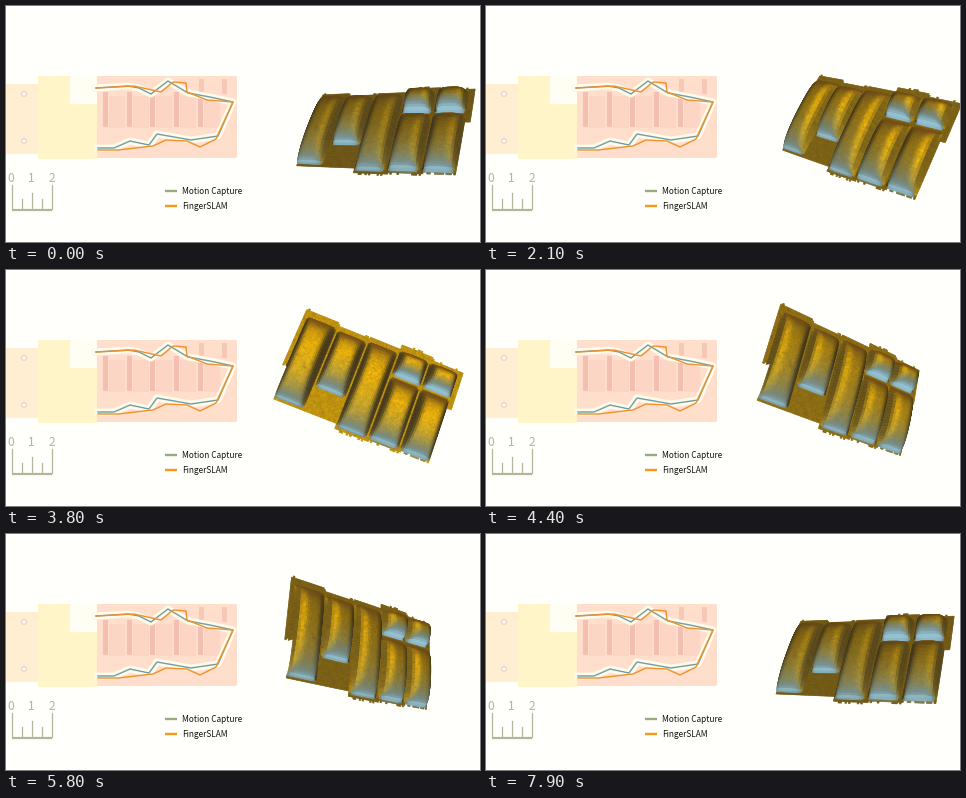
A matplotlib script for the animation above (8 s loop, 474x236 px).

```python
import numpy as np
import matplotlib.pyplot as plt
from matplotlib.animation import FuncAnimation
from matplotlib.collections import PolyCollection
from matplotlib.patches import Circle, Rectangle

W, H, DPI = 474, 236, 100
FRAMES, INTERVAL = 80, 100
PX = 72 / DPI
PAPER = "#fffffb"

fig = plt.figure(figsize=(W / DPI, H / DPI), dpi=DPI, facecolor=PAPER)
ax = fig.add_axes([0, 0, 1, 1])
ax.set(xlim=(0, W), ylim=(H, 0))
ax.axis("off")


def box(x0, y0, x1, y1, color):
    ax.add_patch(Rectangle((x0, y0), x1 - x0, y1 - y0, fc=color, lw=0))


def path(points, color, width, **style):
    x, y = zip(*points)
    ax.plot(x, y, color=color, lw=width * PX, **style)


def label(x, y, text, size, color, **style):
    ax.text(x, y, text, fontsize=size * PX, color=color,
            family="Noto Sans CJK JP", va="baseline", **style)


def draw_plate():
    box(0, 78, 33, 148, "#ffeed2")
    box(32, 70, 92, 153, "#fff5c8")
    box(91, 70, 231, 152, "#ffdecb")
    box(64, 70, 91, 98, "#fffef4")
    for i in range(5):
        x = 97 + 23.7 * i
        box(x + 6, 90, x + 22, 122, "#fcd5c4")
        box(x, 86, x + 5, 121, "#f3bfb0")
    for x in (193, 216):
        box(x, 73, x + 5, 88, "#f6c8b8")
    for y in (88, 135):
        ax.add_patch(Circle((18, y), 2.3, fc="#fffaf0", ec="#d8c9bb", lw=0.6))


def draw_tracks():
    capture = [(90, 82), (122, 80), (133, 82), (145, 88), (162, 75),
               (182, 87), (204, 91), (227, 96), (212, 130), (185, 134),
               (151, 128), (143, 139), (124, 135), (108, 142), (92, 142)]
    slam = [(90, 82), (128, 80), (155, 86), (167, 76), (180, 77), (181, 86),
            (201, 94), (227, 96), (210, 133), (194, 141), (181, 135),
            (160, 134), (147, 140), (112, 144), (92, 144)]
    path(capture, "#fffbec", 7, solid_joinstyle="round")
    path(capture, "#6f9f9f", 1.4)
    path(slam, "#ee912c", 1.4)


def draw_ruler():
    gray = "#b4b49c"
    path([(6, 203.5), (46, 203.5)], gray, 2.2, solid_capstyle="butt")
    for i in range(5):
        top = 193 - 14 * (i % 4 == 0) - 6 * (i == 2)
        path([(6 + 10 * i, 203), (6 + 10 * i, top)], gray, 1.2)
    for i in range(3):
        label(5 + 20.5 * i, 176.5, str(i), 12, gray, ha="center")


def draw_legend():
    for y, color, text in ((185, "#97ab85", "Motion Capture"),
                           (200, "#f2991c", "FingerSLAM")):
        path([(159, y), (171, y)], color, 2.4, solid_capstyle="butt")
        label(176.3, y + 3, text, 8.3, "#111111")


# Scanned slab: u runs along it, v from the far to the near edge (both 0..1).
LENGTH, DEPTH, RELIEF = 174, 100, 15
SPLIT = [(.05, .30), (.35, .98)]
COLUMNS = [[(.08, .94)], [(.10, .70)], [(.08, .99)], SPLIT, SPLIT]
FAR = np.array([0, .03, .02, -.04, 0])
NEAR = np.array([.97, .97, 1.03, 1.01, 1])


def relief(u, v):
    """Height of the rounded keys that stand on the slab."""
    height = np.zeros_like(u)
    for i, spans in enumerate(COLUMNS):
        s = (u - .108 - .193 * i) / .082
        for far, near in spans:
            q = (v - far) / (near - far)
            across = np.clip(1 - s ** 4, 0, 1)
            along = np.clip((1 - q ** 4) * (1 - (1 - q) ** 10), 0, 1)
            inside = (q > 0) & (q < 1)
            height = np.maximum(height, inside * np.sqrt(across * along))
    return RELIEF * height


def inside_outline(u, v):
    rng = np.random.default_rng(8)
    v = v + rng.uniform(-.008, .008, (1, u.shape[1]))
    column = np.clip(u * 5, 0, 4).astype(int)
    return ((v > FAR[column]) & (v < NEAR[column])
            & (u > .035 * (v > .62)) & (u < 1 - .035 * (v > .42)))


def slab_points(u, v):
    return np.stack([(u - .5) * LENGTH, (v - .5) * DEPTH, relief(u, v)], -1)


def rotation(t):
    """Slab orientation: depth tilt (p, q, r), then a spin in the picture."""
    turn = 2 * np.pi * t / 8
    sway = turn - 2 * np.pi * 1.1 / 8
    p = .07 + .56 * np.cos(sway - .18) - .15 * np.cos(2 * sway)
    q = .36 + .15 * np.cos(turn) + .05 * np.cos(2 * turn) + .11 * np.sin(2 * turn)
    r = np.sqrt(1 - p * p - q * q)
    spin = np.radians(14 + 9 * np.cos(turn - .75 * np.pi))
    k = 1 / (1 + r)
    tilt = np.array([[1 - p * p * k, -p * q * k, -p],
                     [-p * q * k, 1 - q * q * k, -q],
                     [p, q, r]])
    c, s = np.cos(spin), np.sin(spin)
    centre = np.array([369, 119]) + np.array([11, 6]) * np.cos(sway)
    return np.array([[c, -s, 0], [s, c, 0], [0, 0, 1]]) @ tilt, centre


def blend(a, b, amount):
    return a + (np.array(b) - a) * np.clip(amount, 0, 1)[..., None]


U, V = np.meshgrid(np.linspace(0, 1, 100), np.linspace(-.05, 1.04, 64))
CU, CV = ((g[1:, 1:] + g[:-1, :-1]) / 2 for g in (U, V))
KEEP = inside_outline(CU, CV)
POINTS = slab_points(U, V)

cells = slab_points(CU, CV)
slope_v, slope_u = np.gradient(cells[..., 2], CV[:, 0] * DEPTH, CU[0] * LENGTH)
NORMALS = np.stack([-slope_u, -slope_v, np.ones_like(CU)], -1)[KEEP]
NORMALS /= np.linalg.norm(NORMALS, axis=1, keepdims=True)
CELLS = cells[KEEP]
grain = np.random.default_rng(4).normal(1, .07, CU.shape)[KEEP]
LIT = grain * np.where(CELLS[:, 2] > 1, 1, .75)

surface = PolyCollection([], linewidths=.4)
ax.add_collection(surface, autolim=False)


def shade(view):
    """Gold where the surface faces the viewer, blue on the near slopes."""
    near, away = np.clip(NORMALS[:, 1], 0, 1), np.clip(-NORMALS[:, 1], 0, 1)
    facing = np.clip(NORMALS @ view, 0, 1) ** 4
    gold = facing * LIT * (1 - np.clip(1.6 * near, 0, 1))
    color = blend(np.array([66, 54, 24.]), (250, 188, 6), gold)
    color = blend(color, (176, 108, 16), .6 * away)
    return blend(color, (146, 194, 212), 1.05 * near) / 255


def update(frame):
    turn, centre = rotation(frame * INTERVAL / 1000)
    seen = POINTS @ turn.T
    xy = centre + seen[..., :2] * (1 + .0024 * seen[..., 2:])
    quads = np.stack([xy[:-1, :-1], xy[:-1, 1:], xy[1:, 1:], xy[1:, :-1]], 2)
    order = np.argsort(CELLS @ turn[2])
    colors = shade(turn[2])[order]
    surface.set_verts(quads[KEEP][order])
    surface.set_facecolor(colors)
    surface.set_edgecolor(colors)
    return surface,


draw_plate()
draw_tracks()
draw_ruler()
draw_legend()
anim = FuncAnimation(fig, update, frames=FRAMES, interval=INTERVAL,
                     repeat=True, repeat_delay=0)
plt.show()
```
